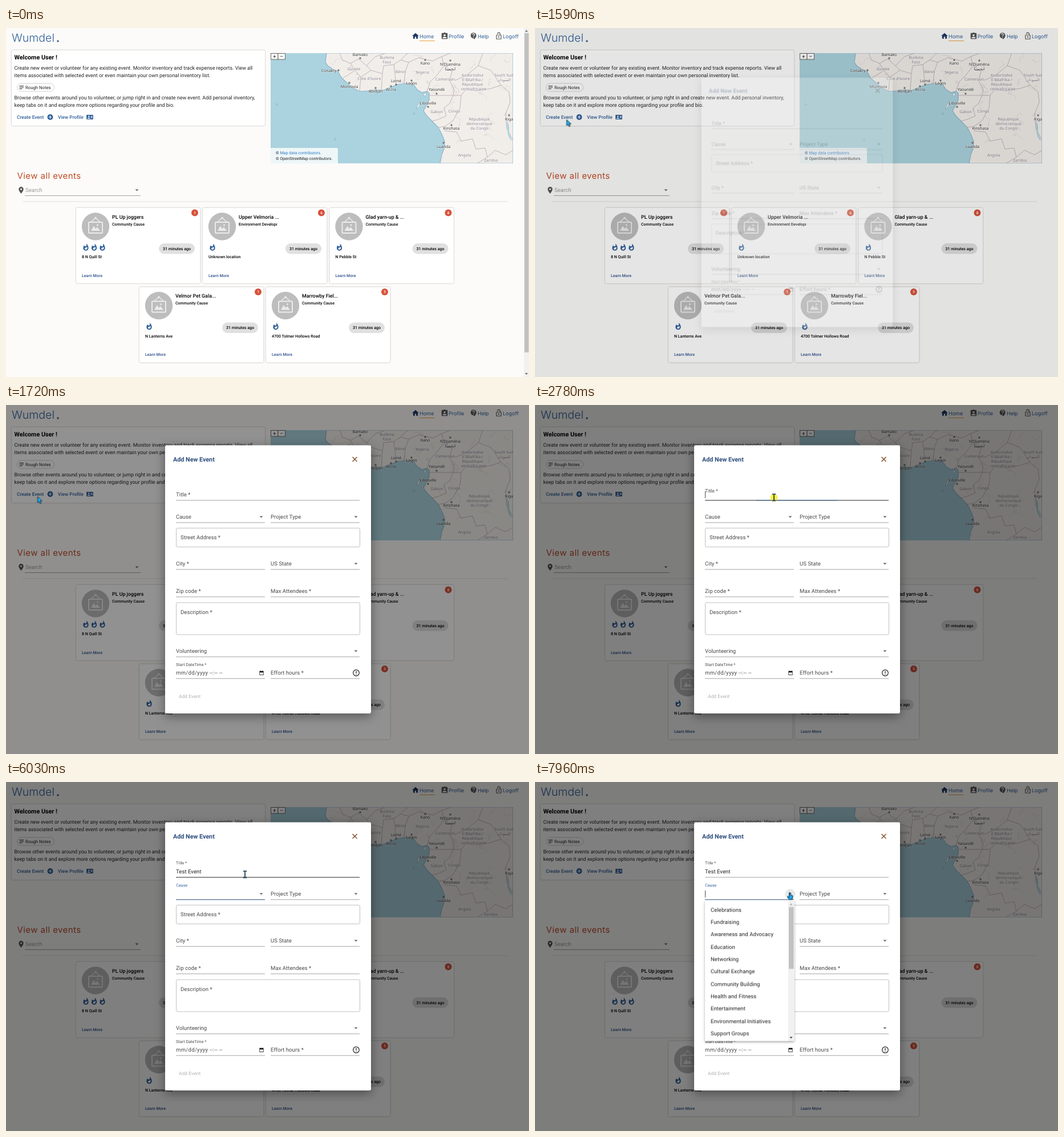
Recreate the animation shown at these times as an HTML page. Size 917x611 px, loop 8 s.

```html
<!DOCTYPE html>
<html lang="en">
<head>
<meta charset="utf-8">
<title>Add event</title>
<style>
  html, body { margin: 0; width: 100%; height: 100%; overflow: hidden; background: #fcfbf9; }
  svg { display: block; }
  #stage { width: 917px; height: 611px; font-family: Roboto, sans-serif; text-rendering: geometricPrecision; }
  .b { font-weight: 500; }
  .c { text-anchor: middle; }
  .geo { font-family: Inter, sans-serif; }
  .map { font-family: "Noto Sans", "DejaVu Sans", sans-serif; text-anchor: middle; paint-order: stroke; stroke: #fff; stroke-opacity: .6; stroke-width: 1.2px; }
  .f { letter-spacing: .006em; fill: #484848; }
  .paper { fill: #fff; filter: drop-shadow(0 .8px .8px #0005); }
  .focus { fill: #2f5f98; transform-box: fill-box; transform-origin: center; }
  #dialog { transform-origin: 459.5px 305px; }
  #panel { transform-origin: 376px 206px; }
  #dialogBox { filter: drop-shadow(0 5px 9px #0006); }
  #panelBox { filter: drop-shadow(0 2px 2px #0005); }
</style>
</head>
<body>
<svg id="stage" viewBox="0 0 917 611" xmlns="http://www.w3.org/2000/svg"></svg>
<script>
const LOOP = 8000, TICK = 66;
const BLUE = '#2f5f98', INK = '#222', GREY = '#484848';

// ---------- drawing helpers ----------
const text = (x, y, s, size, attrs = '') =>
  `<text x="${x}" y="${(y + size * .36).toFixed(2)}" font-size="${size}" ${attrs}>${s}</text>`;
const rect = (x, y, w, h, fill, attrs = '') =>
  `<rect x="${x}" y="${y}" width="${w}" height="${h}" fill="${fill}" ${attrs}/>`;
const path = (d, attrs) => `<path d="${d}" ${attrs}/>`;
const line = (d, color, width = 1, attrs = '') => path(d, `fill="none" stroke="${color}" stroke-width="${width}" ${attrs}`);
const at = (x, y, body) => `<g transform="translate(${x} ${y})">${body}</g>`;

const ICONS = {
  home: 'M10 20v-6h4v6h5v-8h3L12 3 2 12h3v8z',
  profile: 'M19 3h-4.2a3 3 0 0 0-5.6 0H5a2 2 0 0 0-2 2v14a2 2 0 0 0 2 2h14a2 2 0 0 0 2-2V5a2 2 0 0 0-2-2zM12 7a3 3 0 1 1 0 6 3 3 0 0 1 0-6zM18 19H6v-1.4c0-2 4-3.1 6-3.1s6 1.1 6 3.1z',
  help: 'M11.5 2a8.5 8.5 0 0 0 0 17h.5v3c4.9-2.3 8-7 8-11.5A8.5 8.5 0 0 0 11.5 2zM12.5 16.5h-2v-2h2zM12.5 13h-2c0-3.2 3-3 3-5a2 2 0 0 0-4 0h-2a4 4 0 0 1 8 0c0 2.5-3 2.7-3 5z',
  lock: 'M12 17a2 2 0 1 0 0-4 2 2 0 0 0 0 4zM18 8h-1V6A5 5 0 0 0 7 6h1.9a3.1 3.1 0 0 1 6.2 0v2H6a2 2 0 0 0-2 2v10a2 2 0 0 0 2 2h12a2 2 0 0 0 2-2V10a2 2 0 0 0-2-2zM18 20H6V10h12z',
  place: 'M12 2a7 7 0 0 0-7 7c0 5.2 7 13 7 13s7-7.8 7-13a7 7 0 0 0-7-7zM12 6.5a2.5 2.5 0 1 1 0 5 2.5 2.5 0 0 1 0-5z',
  add: 'M12 3.5a8.5 8.5 0 1 0 0 17a8.5 8.5 0 1 0 0-17zM17 13h-4v4h-2v-4H7v-2h4V7h2v4h4z',
  card: 'M2 5h20v14H2zM9 7.5a2.3 2.3 0 1 0 0 4.6 2.3 2.3 0 0 0 0-4.6zM4.5 16.5h9c0-4-9-4-9 0zM15 8.5h5v2h-5zM15 12.5h5v2h-5z',
  flame: 'M13.5.7s.7 2.6.7 4.8c0 2-1.3 3.7-3.4 3.7S7.2 7.5 7.2 5.5v-.4A14 14 0 0 0 4 14a8 8 0 0 0 16 0C20 8.6 17.4 3.8 13.5.7zM11.7 19a3.2 3.2 0 0 1-3.2-3.1c0-1.6 1-2.8 2.8-3.2 1.8-.4 3.6-1.2 4.6-2.5.4 1.3.6 2.6.6 4 0 2.7-2.2 4.8-4.8 4.8z',
  calendar: 'M3 4h3V2h2v2h8V2h2v2h3v18H3zM5 10v10h14V10z'
};
const icon = (name, cx, cy, size, fill) =>
  at(cx - size / 2, cy - size / 2, path(ICONS[name], `transform="scale(${size / 24})" fill="${fill}" fill-rule="evenodd"`));
const arrow = (x, y) => path(`M${x - 3} ${y - 1.5}h6l-3 3z`, 'fill="#666"');

let seed = 11;
const rnd = () => (seed = seed * 16807 % 2147483647) / 2147483647;

// ---------- page ----------
function header() {
  const nav = [['home', 718, 725, 'Home', '#1d3765'], ['profile', 769, 776, 'Profile', '#555'],
               ['help', 820, 827, 'Help', '#555'], ['lock', 864, 871, 'Logoff', '#555']];
  return text(10, 17, 'Wumdel', 19.5, `class="geo" font-weight="300" fill="${BLUE}"`) +
    `<circle cx="91" cy="23" r="1.7" fill="${BLUE}"/>` +
    nav.map(([i, x, tx, s, c]) => icon(i, x, 14, 14, c) + text(tx, 15, s, 9, `class="geo" fill="${BLUE}"`)).join('') +
    rect(725, 22, 27, 1, '#f0a040');
}

function welcome() {
  const copy = [
    [69.5, 'Create new event or volunteer for any existing event. Monitor inventory and track expense reports. View all'],
    [82.5, 'items associated with selected event or even maintain your own personal inventory list.'],
    [122, 'Browse other events around you to volunteer, or jump right in and create new event. Add personal inventory,'],
    [135, 'keep tabs on it and explore more options regarding your profile and bio.']];
  return rect(10, 39, 444, 132, '#fff', 'rx="2.4" class="paper"') +
    text(14.5, 51.5, 'Welcome User !', 10.75, 'font-weight="600"') +
    copy.map(([y, s]) => text(14.5, y, s, 8.92, `fill="${INK}"`)).join('') +
    rect(19.5, 97, 65, 14, '#fff', 'rx="7" stroke="#c4c4c4" stroke-width=".8"') +
    line('M23.5 101.5h7.5M23.5 104h7.5M23.5 106.5h5', '#333') +
    text(34, 104, 'Rough Notes', 7.76, `fill="${INK}"`) +
    text(19, 156, 'Create Event', 8.36, `class="b" fill="${BLUE}"`) + icon('add', 77.5, 156, 14, BLUE) +
    text(91, 156, 'View Profile', 8.36, `class="b" fill="${BLUE}"`) + icon('card', 147, 156, 14, BLUE);
}

function map() {
  const land = 'M562 44L560 60 564 66 573 72 582 76 588 87 599 97 608 105 621 111 634 110 648 108 661 109 674 104 686 99 ' +
    '700 97 714 98 721 108 729 113 738 111 742 114 742 126 737 136 732 145 738 154 747 163 758 174 764 186 769 198 769 209 764 222 761 237H889V44z';
  const borders = [
    'M585 44L590 56 604 62 612 74 600 82 590 88', 'M612 74L622 86 620 111', 'M622 86L640 74 660 80 658 109', 'M604 62L618 54 632 66 640 74',
    'M632 66L648 50 666 44', 'M660 80L662 66 680 64 684 99', 'M680 64L692 56 706 60 700 76 698 97', 'M692 56L702 46 706 44',
    'M706 60L724 52 748 58 764 50 768 66 756 82 744 94 738 111', 'M764 50L780 44', 'M768 66L782 76 778 92 786 108 784 118 742 118',
    'M786 92L806 84 828 66 850 74 868 100 850 106 826 110 806 108 798 118 784 118', 'M828 66L836 44', 'M784 118L778 132 768 140 772 154 758 160 747 163',
    'M798 118L796 140 784 162 770 172 758 174', 'M769 180L790 182 798 198 818 194 824 212 840 210 844 226 826 237',
    'M868 100L882 112 884 130 876 150 878 176 889 196', 'M844 226L858 214 876 222 889 214'];
  const local = Array.from({ length: 64 }, () => {
    let d = `M${565 + rnd() * 320 | 0} ${44 + rnd() * 193 | 0}`;
    for (let i = 0; i < 6; i++) d += `l${(rnd() * 14 - 7).toFixed(1)} ${(rnd() * 12 - 6).toFixed(1)}`;
    return d;
  }).join('');
  const countries = [[668, 52, 'Burkina'], [668, 60, 'Faso'], [610, 72, 'Guinée'], [692, 77, 'Bénin'], [730, 78, 'Nigeria'],
    [637, 89, "Côte d'Ivoire"], [770, 90, 'Cameroun'], [818, 83, 'Kodorösêse'], [818, 91, 'tî Bêafrîka /'], [818, 99, 'République'],
    [820, 107, 'centrafricaine'], [873, 83, 'South Sud'], [873, 91, 'السودان'], [755, 147, 'Gabon'], [786, 146, 'Congo'],
    [830, 160, 'République'], [830, 168, 'démocratique'], [830, 176, 'du Congo'], [804, 223, 'Angola'], [850, 232, 'Zambia']];
  const cities = [[621, 47, 'Bamako', 6], [735, 62, 'Kano', -6], [779, 64, "N'Djaména", -7], [779, 72, 'انجمينا'], [566, 75, 'Conakry', -1, 17],
    [602, 103, 'Monrovia', -7], [648, 111, 'Abidjan', -6], [675, 108, 'Accra', -6], [684, 93, 'Lomé', 6], [711, 97, 'Lagos', -5],
    [755, 108, 'Yaoundé', 7], [740, 132, 'Libreville', 6], [781, 176, 'Kinshasa', -6], [882, 160, 'Kiga', -7], [767, 208, 'Luanda', -7]];
  const btn = (x, s) => rect(x, 44.5, 12.5, 10.5, '#fff', 'stroke="#666"') + text(x + 6.25, 49.5, s, 9, 'class="c"');
  return `<clipPath id="land"><path d="${land}"/></clipPath><clipPath id="frame">${rect(464, 44, 425, 193, '#000')}</clipPath><g clip-path="url(#frame)">` +
    rect(464, 44, 425, 193, '#aad3df') +
    path(land, 'fill="#f1eee9" stroke="#8fb3cc" stroke-width="1.2"') +
    `<g clip-path="url(#land)">${line(local, '#ddd5d5', .7)}${line(borders.join(''), '#c3b2be')}</g>` +
    path('M878 162q5 8 4 16t6 20l-4-3q-5-8-5-18z', 'fill="#aad3df"') +
    path('M732 116l4-3 1 4-3 3zM721 137l5-9-1 9-5 5z', 'fill="#f1eee9" stroke="#8fb3cc" stroke-width=".8"') +
    [[475, 134], [577, 195], [715, 150]].map(([x, y]) => `<circle cx="${x}" cy="${y}" r="1.6" fill="none" stroke="#91b3c0" stroke-width=".8"/>`).join('') +
    countries.map(([x, y, s]) => text(x, y, s, 6.9, 'class="map" fill="#8a7f8c"')).join('') +
    cities.map(([x, y, s, dy, dx = 0]) => (dy ? `<circle cx="${x + dx}" cy="${y + dy}" r="1.7" fill="#777"/>` : '') +
      text(x, y, s, 6.9, 'class="map" fill="#333"')).join('') +
    path('M464 210h115.5a2.500 2.500 0 0 1 2.500 2.500V237H464z', 'fill="#fff" fill-opacity=".8"') + '</g>' +
    text(473, 218, '© <tspan fill="#2a7cc7">Map data contributors.</tspan>', 7.15, `fill="${INK}"`) +
    text(473, 228.5, '© OpenStreetMap contributors.', 7.15, `fill="${INK}"`) + btn(464.5, '+') + btn(477, '–');
}

function search() {
  return text(19.5, 258.5, 'View all events', 15, 'class="geo" fill="#bf4a26" letter-spacing=".42"') +
    icon('place', 26.5, 284, 14.3, '#555') + text(34, 284, 'Search', 9.55, 'class="f" style="fill:#999"') +
    arrow(229.5, 284) + rect(33, 293, 203, .8, '#8c8c8c') + rect(29, 303.5, 851, .8, '#dcdad8');
}

function card(x, y, title, cause, place, count, flames) {
  const avatar = '<circle r="24.2" fill="#bdbdbd"/>' + line('M-9-7L0-15 9-7', '#ebebeb', 1.4) +
    '<circle cy="-15" r="1.8" fill="#ebebeb"/>' + rect(-12, -7.5, 24, 19, 'none', 'rx="1" stroke="#ebebeb" stroke-width="2"') +
    path('M-8 7.5L-3-1 0 4 3 1 8 7.5z', 'fill="#ebebeb"') + '<circle cx="3.5" cy="-2.5" r="1.5" fill="#ebebeb"/>';
  return at(x, y, rect(0, 0, 217.5, 132, '#fff', 'rx="2.4" class="paper"') + at(34, 32.5, avatar) +
    text(63, 15.5, title, 8.85, 'class="b"') +
    `<svg x="63" y="21" width="67.5" height="13">${text(0, 7, cause, 6.95, 'class="b"')}</svg>` +
    '<circle cx="208" cy="8.5" r="6" fill="#d8513a"/>' + text(208, 8.5, count, 6.5, 'class="b c" fill="#fff"') +
    Array.from({ length: flames }, (_, i) => icon('flame', 17 + i * 14.5, 69, 14, BLUE)).join('') +
    rect(145, 62, 63, 18.5, '#e0e0e0', 'rx="9.25"') + text(176.5, 71.2, '31 minutes ago', 7.1, 'class="b c"') +
    text(10, 85.7, place, 7.05, 'class="b"') + text(10, 118, 'Learn More', 7.05, 'class="b" fill="#2b4f8c"'));
}

const cards = () => [
  [123, 315, 'PL Up joggers', 'Community Cause', '8 N Quill St', 1, 3],
  [345, 315, 'Upper Velmoria ...', 'Environment Development', 'Unknown location', 6, 1],
  [567.5, 315, 'Glad yarn-up &amp; ...', 'Community Cause', 'N Pebble St', 8, 1],
  [234, 453.5, 'Velmor Pet Gala...', 'Community Cause', 'N Lanterns Ave', 1, 1],
  [456, 453.5, 'Marrowby Fiel...', 'Community Cause', '4700 Tolmer Hollows Road', 5, 1]
].map(c => card(...c)).join('');

const scrollbar = () => `<g id="scroll">${rect(908, 0, 9, 611, '#f1f1f1')}${rect(909, 9, 7.5, 559, '#c1c1c1')}` +
  path('M910 6.5h5l-2.5-3zM910 604h5l-2.5 3z', 'fill="#666"') + '</g>';

// ---------- dialog ----------
const label = (x, y, s, id = '') => at(x, y, text(0, 0, s, 9.55, `class="f" id="${id}"`));
const under = (x, y, w, fill = '#8c8c8c', attrs = '') => rect(x, y + 9.5, w, .8, fill, attrs);
const field = (x, y, w, s, drop, id) => under(x, y, w) + label(x, y, s, id) + (drop ? arrow(x + w - 6.5, y) : '');
const boxed = (y, h, s, ty) => rect(298.5, y, 322, h, 'none', 'rx="2.4" stroke="#b0b0b0" stroke-width=".8"') + label(306, ty, s);

function dialog() {
  return '<g id="dialog">' + rect(279, 70.5, 361, 469.5, '#fff', 'id="dialogBox" rx="2.4"') +
    text(293, 95, 'Add New Event', 10.75, 'font-weight="600" fill="#2d4f7f"') + line('M607.5 91l8 8m0-8l-8 8', '#7d4520', 1.3) +
    text(298, 157, 'Test Event', 9.55, 'id="typed" class="f" style="fill:#222"') +
    `<g id="cover">${rect(298, 150, 55, 14, '#fff')}${rect(298, 151, .8, 12, '#222', 'id="caret"')}</g>` +
    field(298, 157, 322, 'Title *', false, 'titleLabel') +
    under(298, 157, 322, '#333', 'id="titleHover"') + under(298, 157, 322, BLUE, 'id="titleLine" class="focus"') +
    field(298, 196, 156, 'Cause', true, 'causeLabel') + under(298, 196, 156, BLUE, 'id="causeLine" class="focus"') +
    rect(298, 190, .8, 12, '#222', 'id="causeCaret"') +
    field(464, 196, 156, 'Project Type', true) + boxed(215.5, 33, 'Street Address *', 232) +
    field(298, 278, 156, 'City *') + field(464, 278, 156, 'US State', true) +
    field(298, 326, 156, 'Zip code *') + field(464, 326, 156, 'Max Attendees *') + boxed(346, 56, 'Description *', 362.5) +
    field(298, 431, 322, 'Volunteering', true) +
    text(298, 454.5, 'Start DateTime *', 7.15, 'class="f"') + text(298, 468.5, 'mm/dd/yyyy --:-- --', 9.55, 'class="f" style="letter-spacing:.03em"') +
    under(298, 469, 156) + icon('calendar', 448, 469, 9.5, '#111') +
    field(464, 469, 156, 'Effort hours *') + '<circle cx="614" cy="469" r="5.3" fill="none" stroke="#222" stroke-width="1.2"/>' +
    line('M614 465.8v3.8m0 1.2v1.3', '#222', 1.3) + text(303, 509.5, 'Add Event', 8.36, 'fill="#b0b0b0" letter-spacing=".1"') + '</g>';
}

function panel() {
  const causes = ['Celebrations', 'Fundraising', 'Awareness and Advocacy', 'Education', 'Networking', 'Cultural Exchange',
    'Community Building', 'Health and Fitness', 'Entertainment', 'Environmental Initiatives', 'Support Groups'];
  return '<g id="panel">' + rect(298, 207, 156.5, 246.5, '#fff', 'id="panelBox"') +
    causes.map((s, i) => text(308, 223.3 + i * 21.68, s, 9.55, 'class="f" style="fill:#222"')).join('') +
    rect(444, 207, 10.5, 246.5, '#f1f1f1') + rect(445, 219, 8.5, 108, '#c1c1c1') +
    path('M446.5 215.5h5l-2.5-3z', 'fill="#a3a3a3"') + path('M446.5 446h5l-2.5 3z', 'fill="#444"') + '</g>';
}

const pointer = () => '<circle id="halo" cx="447.5" cy="196" r="9" fill="#000" fill-opacity=".09"/><g id="cursor">' +
  '<circle id="click" cy=".5" r="6.5" fill="#ffee22" fill-opacity=".85"/>' +
  path('M0 0v10.5l2.5-2.2 1.7 3.8 2-.9-1.7-3.7h3.4z', 'id="arrow" fill="#18b4f4" stroke="#10222e" stroke-width=".9"') +
  line('M-3.2-5.3h2.2l1 1 1-1h2.2M0-4.5v9.500M-3.2 5.8h2.2l1-1 1 1h2.2', '#123447', 1.7, 'id="beam"') +
  path('M-1.5-1.5q1-1.5 2 0v3.5l3.6 1q1.3.6.9 2.5l-1 4.5h-5.5l-3-4q-.2-1.6 1.4-1.2l1.6 1z', 'id="hand" fill="#18a8e8" stroke="#10222e" stroke-width=".9"') + '</g>';

const stage = document.getElementById('stage');
stage.innerHTML = rect(0, 0, 917, 611, '#fcfbf9') + header() + welcome() + map() + search() + cards() + scrollbar() +
  rect(0, 0, 917, 611, '#000', 'id="shade"') + dialog() + panel() + pointer();

// ---------- motion: every value holds until the next one ----------
const $ = id => document.getElementById(id);
function play(id, prop, steps) {
  const frames = steps.map(([t, v]) => ({ offset: t / LOOP, [prop]: v, easing: 'steps(1, end)' }));
  frames.push({ offset: 1, [prop]: steps[steps.length - 1][1] });
  $(id).animate(frames, { duration: LOOP, iterations: Infinity });
}
// Hidden at first, then toggled at each time.
const toggle = (id, ...times) => play(id, 'opacity', [[0, 0], ...times.map((t, i) => [t, 1 - i % 2])]);

const shift = (x, y) => `translate(${x}px, ${y}px)`;
// A hand movement: quick start, longer settling.
const reach = u => { const p = u ** .75; return p * p * (3 - 2 * p); };
const glide = (t, n, x0, y0, x1, y1) => Array.from({ length: n }, (_, i) => {
  const p = reach((i + 1) / n);
  return [t + i * TICK, shift(x0 + (x1 - x0) * p, y0 + (y1 - y0) * p)];
});

play('cursor', 'transform', [
  [0, shift(-50, -50)],
  ...glide(200, 13, 900, 610, 54, 166),
  [1060, shift(50.5, 165)], [1130, shift(55.5, 160.5)],
  ...glide(2120, 6, 55.5, 160.5, 419, 161.5),
  ...glide(6430, 3, 419, 161.5, 424, 216),
  [6760, shift(425, 210)], [6830, shift(424, 202)], [6890, shift(423, 194.5)], [6960, shift(422, 197)],
  [7360, shift(422, 197.5)], [7560, shift(432, 197)], [7630, shift(444, 196)], [7690, shift(447, 195.5)]]);
play('arrow', 'opacity', [[0, 1], [2440, 0]]);
toggle('beam', 2440, 7630);
toggle('hand', 7630);
toggle('click', 1390, 1520, 2780, 2910, 7760, 7890);
toggle('halo', 7690);

play('scroll', 'opacity', [[0, 1], [1590, 0]]);
play('shade', 'opacity', [[0, 0], [1590, .1], [1660, .27], [1720, .43], [1790, .5]]);
play('dialog', 'opacity', [[0, 0], [1590, .25], [1660, .76], [1720, 1]]);
play('dialog', 'transform', [[0, 'scale(.8)'], [1590, 'scale(.93)'], [1660, 'scale(1)']]);

// A label floats from the line (0) to above it (1).
const lift = p => `translateY(${-15 * p}px) scale(${1 - .25 * p})`;
const float = (id, t) => play(id, 'transform', [[0, lift(0)], [t, lift(.43)], [t + 70, lift(.83)], [t + 130, lift(1)]]);
const spread = (id, t, end) => play(id, 'transform',
  [[0, 'scaleX(0)'], [t, 'scaleX(.45)'], [t + 70, 'scaleX(.85)'], [t + 130, 'scaleX(.97)'], [t + 200, 'scaleX(1)'], ...(end ? [[end, 'scaleX(0)']] : [])]);

float('titleLabel', 2780);
play('titleLabel', 'fill', [[0, GREY], [2850, BLUE], [5570, GREY]]);
spread('titleLine', 2780, 5570);
toggle('titleHover', 2450, 6430);
float('causeLabel', 5500);
play('causeLabel', 'fill', [[0, GREY], [5570, BLUE]]);
spread('causeLine', 5500);

toggle('caret', 2780, 3320, 3650, 5500);
toggle('causeCaret', 5500, 6030, 6560, 7090, 7620);
const keys = [3650, 3850, 3980, 4110, 4250, 4710, 4900, 5030, 5100, 5230];
play('cover', 'transform', [[0, shift(0, 0)],
  ...keys.map((t, i) => [t, shift($('typed').getSubStringLength(0, i + 1), 0)])]);

play('panel', 'opacity', [[0, 0], [7820, .45], [7890, 1]]);
play('panel', 'transform', [[0, 'scaleY(.8)'], [7820, 'scaleY(.9)'], [7890, 'scaleY(.99)'], [7950, 'scaleY(1)']]);
</script>
</body>
</html>
```
